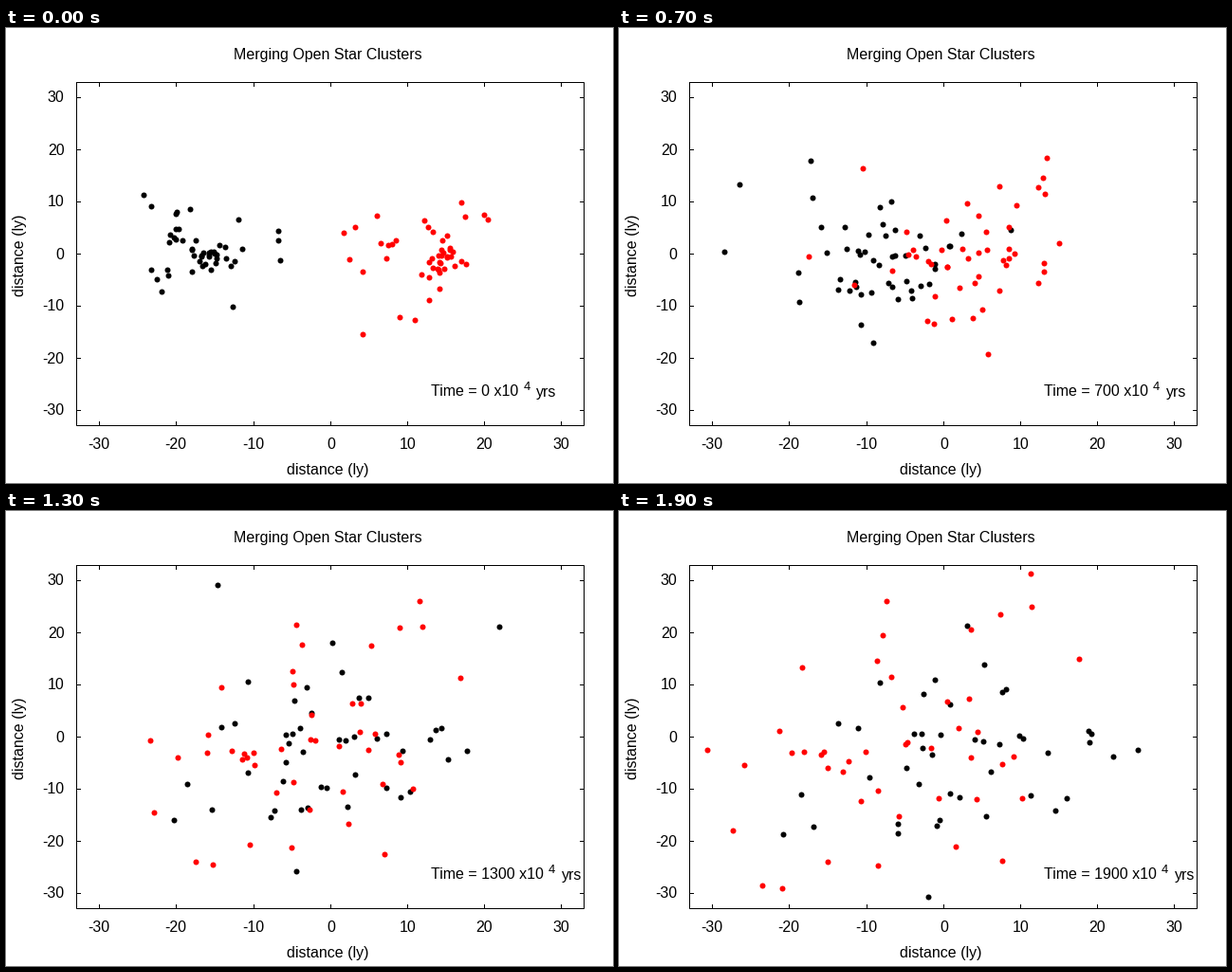
These frames come from a looping animation (640 px wide and 480 px high, 2000 ms). A matplotlib script:

```python
import numpy as np
import matplotlib.pyplot as plt
from matplotlib.animation import FuncAnimation

FRAMES, STEP = 20, 100
PX = 0.72                      # points per pixel at 100 dpi
LEFT, TOP, RIGHT, BOTTOM = 74, 57, 609, 419

plt.rcParams["font.family"] = "Liberation Sans"
plt.rcParams["font.size"] = 16 * PX


class Cluster:
    """Dense core and loose halo that drift and spread as they merge.

    core, halo and end are (centre, spread) pairs in stage pixels.
    Each runaway is (start x, start y, exit x, exit y, power of y motion).
    """

    def __init__(self, ax, color, core, halo, end, runaways, seed):
        rng = np.random.default_rng(seed)
        self.start = np.vstack([rng.normal(*core, (15, 2)),
                                rng.normal(*halo, (31, 2))])
        self.end = rng.normal(*end, self.start.shape)
        self.runaways = np.array(runaways, float)
        self.dots, = ax.plot([], [], "o", color=color, ms=6 * PX, mew=0,
                             antialiased=False)

    def move(self, u):
        mix = np.sin(np.pi / 2 * u) ** 1.3
        pos = self.start + (self.end - self.start) * mix
        x0, y0, x1, y1, power = self.runaways.T
        fast = np.column_stack([x0 + (x1 - x0) * u,
                                y0 + (y1 - y0) * u ** power])
        x, y = np.rint(np.vstack([pos, fast])).T
        seen = (x > LEFT) & (x < RIGHT) & (y > TOP) & (y < BOTTOM)
        self.dots.set_data(x[seen], y[seen])


fig = plt.figure(figsize=(6.4, 4.8), dpi=100, facecolor="white")
ax = fig.add_axes([0, 0, 1, 1])
ax.set_xlim(-0.5, 639.5)       # whole numbers fall on pixel centres
ax.set_ylim(479.5, -0.5)
ax.axis("off")


def line(xs, ys):
    ax.plot(xs, ys, color="black", lw=PX, snap=False,
            solid_capstyle="projecting", solid_joinstyle="miter")


def draw_axes():
    line([LEFT, RIGHT, RIGHT, LEFT, LEFT], [TOP, TOP, BOTTOM, BOTTOM, TOP])
    for v in range(-30, 31, 10):
        x, y = round(341.6 + 8.106 * v), round(238 - 5.5 * v)
        for edge, d in ((TOP, 4), (BOTTOM, -4)):
            line([x, x], [edge, edge + d])
        for edge, d in ((LEFT, 4), (RIGHT, -4)):
            line([edge, edge + d], [y, y])
        ax.text(x - (v < 0), 443, str(v), ha="center", va="baseline")
        ax.text(61, y + 5, str(v), ha="right", va="baseline")
    ax.text(339, 33, "Merging Open Star Clusters", ha="center",
            va="baseline")
    ax.text(338.5, 471, "distance (ly)", ha="center", va="baseline")
    ax.text(22, 239.5, "distance (ly)", rotation=90, ha="right", va="center")


def follow(prev, text, y, gap, size):
    """Place text a fixed gap to the right of another one."""
    return ax.annotate(text, (1, y), xycoords=(prev, "data"),
                       xytext=(gap * PX, 0), textcoords="offset points",
                       ha="left", va="baseline", size=size * PX,
                       annotation_clip=False)


draw_axes()
clock = ax.text(448, 388, "", va="baseline")
exponent = follow(clock, "4", 382, 4.5, 13)
follow(exponent, "yrs", 388, 6.5, 16)
clusters = [
    Cluster(ax, "black",
            core=((218, 239), (8, 5)), halo=((208, 227), (38, 27)),
            end=((320, 243), (105, 72)),
            runaways=[(288, 244, 625, -40, 2.2), (193, 190, 10, 120, 1),
                      (219, 237, 350, 657, 1.5)], seed=4),
    Cluster(ax, "red",
            core=((461, 238), (8, 6)), halo=((454, 236), (54, 36)),
            end=((272, 236), (105, 72)),
            runaways=[(464, 241, 425, -45, 1), (361, 243, -80, 236, 1)],
            seed=9),
]


def update(i):
    for cluster in clusters:
        cluster.move(i / (FRAMES - 1))
    clock.set_text(f"Time = {100 * i} x10")
    return []


anim = FuncAnimation(fig, update, frames=FRAMES, interval=STEP,
                     init_func=lambda: update(0), repeat=True,
                     repeat_delay=0, blit=False)
plt.show()
```
